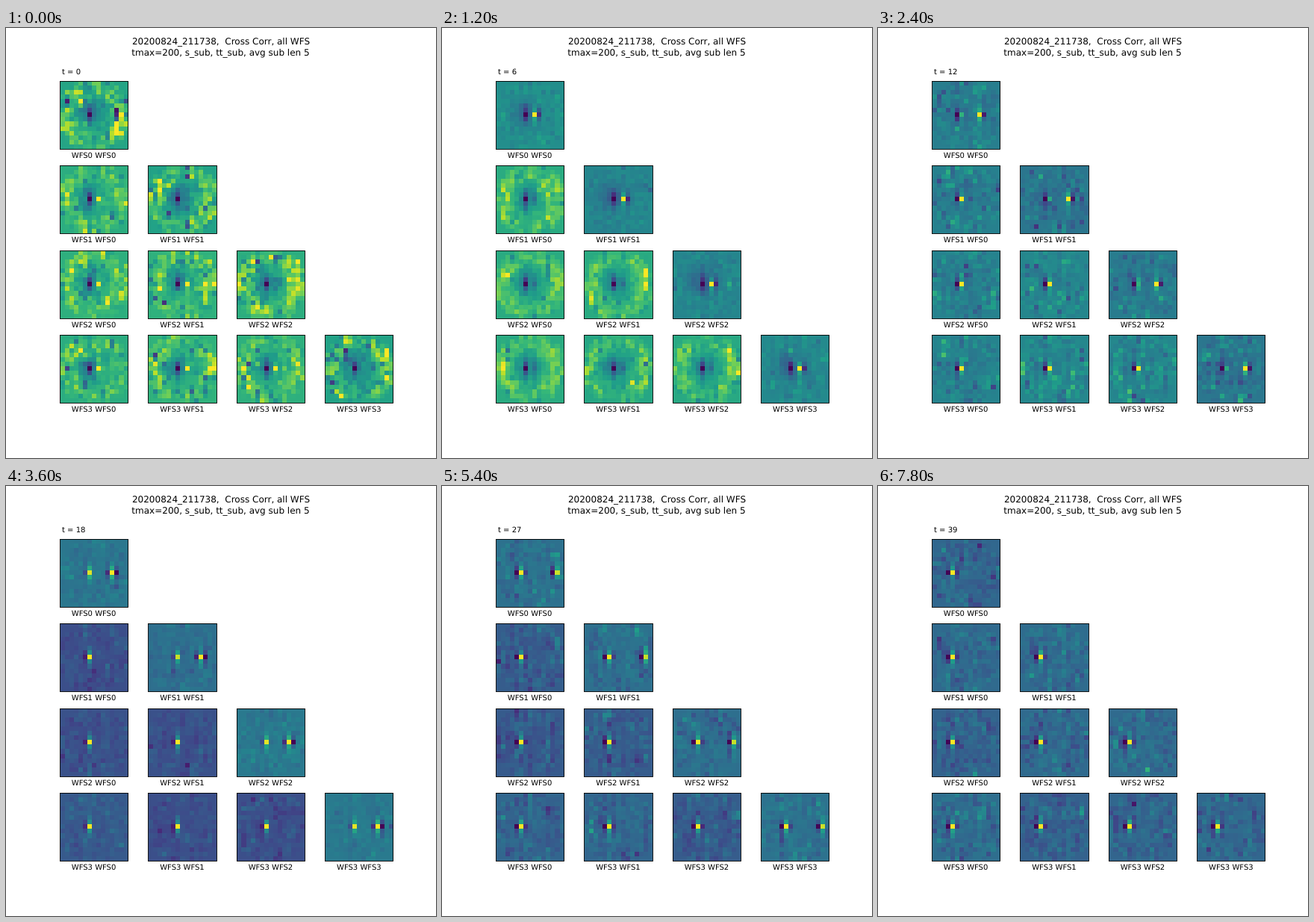
Animation of 576 by 576 pixels, one loop 8 s. Source, as an HTML page:

```html
<!DOCTYPE html>
<html lang="en">
<head>
<meta charset="utf-8">
<title>Cross Corr</title>
<style>
html, body { margin: 0; width: 100%; height: 100%; overflow: hidden; background: #fff; }
svg { display: block; width: 576px; height: 576px; }
text { font: 10px "DejaVu Sans", sans-serif; white-space: pre; text-rendering: geometricPrecision; }
.title { font-size: 12px; }
.mid { text-anchor: middle; }
</style>
</head>
<body>
<svg viewBox="0 0 576 576"></svg>
<script>
const N = 15, MID = 7, SIZE = 91.1, STEP = SIZE / N;
const FRAMES = 40, FRAME_MS = 200;
const svg = document.querySelector('svg');

const VIRIDIS = ['440154', '482878', '3e4989', '31688e', '26828e',
  '1f9e89', '35b779', '6ece58', 'b5de2b', 'fde725']
  .map(h => [0, 2, 4].map(i => parseInt(h.slice(i, i + 2), 16)));

const clamp = v => Math.min(1, Math.max(0, v));
const mix = (a, b, f) => a + (b - a) * f;
const ramp = (t, from, to) => clamp((t - from) / (to - from));
const pulse = (t, at, width) => clamp(1 - Math.abs(t - at) / width);

function color(v) {
  const s = clamp(v) * 9, i = Math.min(8, Math.floor(s));
  return `rgb(${VIRIDIS[i].map((c, j) => Math.round(mix(c, VIRIDIS[i + 1][j], s - i)))})`;
}

// Seeded random number in -1..1.
function hash(...seed) {
  let h = 17;
  for (const s of seed) {
    h = Math.imul(h ^ (s + 11), 2246822519);
    h = Math.imul(h ^ h >>> 15, 3266489917);
    h ^= h >>> 13;
  }
  return (h >>> 0) / 2147483648 - 1;
}

// Drifts in time, runs in vertical streaks and has rare strong outliers.
function noise(p, x, y, t) {
  const k = Math.floor(t / 4);
  const at = i => .7 * hash(p, x, y, i) + .6 * hash(p, x, Math.floor(y / 3), i, 1);
  const n = mix(at(k), at(k + 1), t / 4 - k);
  return n + .8 * n ** 5;
}

// Autocorrelations (diagonal panels) and cross-correlations evolve differently.
const autoLook = t => ({
  level: .34 + .26 * Math.exp(-t / 10) + .13 * pulse(t, 34, 4),
  ring: .2 * (1 - ramp(t, 0, 6)),
  rough: .08 + .03 * ramp(t, 20, 34),
  peak: ramp(t, 8, 26)
});
const crossLook = t => ({
  level: .62 - .36 * ramp(t, 6, 18) + .07 * ramp(t, 18, 30) + .1 * pulse(t, 34, 4),
  ring: .1 + .06 * ramp(t, 0, 6) - .16 * ramp(t, 6, 12),
  rough: .08 + .03 * ramp(t, 20, 34) + .07 * pulse(t, 34, 4),
  peak: ramp(t, 6, 12)
});

function field(p, diagonal, t) {
  const { level, ring, rough, peak } = (diagonal ? autoLook : crossLook)(t);
  const base = level + .03 * hash(p, Math.floor(t / 6));
  const dip = .2 * (1 - ramp(t, 4, 16));
  const cells = [];
  for (let y = 0; y < N; y++) for (let x = 0; x < N; x++) {
    const dx = x - MID, r = Math.hypot(dx, y - MID);
    const inside = ramp(r, 8.6, 7.4), n = noise(p, x, y, t);
    const side = .2 + .8 * Math.abs(dx) / (r || 1);
    const hollow = Math.exp(-((x - 6) ** 2 + (y - 6.5) ** 2) / 7);
    const glow = ring * side * Math.exp(-(((r - 6) / 2) ** 2));
    cells.push(base - dip * hollow + inside * (glow * (1 + n) + rough * (.5 + r / 14) * n));
  }

  // A spot bleeds into the cells above and below.
  const spot = (x, offset) => {
    if (x < 0 || x >= N || !offset) return;
    const d = clamp(base + offset) - base;
    cells[MID * N + x] = base + d;
    for (const [dy, share] of [[1, .32], [2, .12]])
      for (const y of [MID - dy, MID + dy]) cells[y * N + x] += d * share;
  };

  // The slow peak drifts left; its dark edge fades while it lies between two columns.
  const slow = 7 - .072 * t, s = Math.round(slow);
  const edge = Math.max(ramp(slow - s, -.3, 0), 1 - ramp(t, 8, 11));
  spot(s - 1, -mix(.15, 1, edge));
  spot(s, peak);
  spot(s + 1, -.18 * ramp(t, 20, 27));

  if (diagonal) {
    // The fast peak travels right and leaves the panel.
    const f = Math.round(7 + .235 * t), on = ramp(t, 0, 3);
    spot(f - 1, -ramp(t, 15, 26));
    spot(f, on * mix(1, .55, ramp(t, 18, 27)));
    spot(f + 1, -on * mix(.35, .8, ramp(t, 12, 18)) * (1 - ramp(t, 20, 27)));
  } else {
    spot(MID + 1, mix(1, -.25, ramp(t, 0, 5)) * (1 - ramp(t, 6, 11)));
  }
  return cells;
}

function add(tag, attrs, text = '') {
  const el = document.createElementNS('http://www.w3.org/2000/svg', tag);
  for (const k in attrs) el.setAttribute(k, attrs[k]);
  el.textContent = text;
  return svg.appendChild(el);
}

add('text', { x: 288, y: 22, class: 'title mid' }, '20200824_211738,  Cross Corr, all WFS');
add('text', { x: 287.5, y: 37, class: 'title mid' }, 'tmax=200, s_sub, tt_sub, avg sub len 5');
const clock = add('text', { x: 75, y: 62 });

const panels = [];
for (let row = 0; row < 4; row++) for (let col = 0; col <= row; col++) {
  const left = 72 + 118.43 * col, x = Math.round(left), y = Math.round(71 + 113.4 * row);
  const rects = [];
  for (let i = 0; i < N * N; i++) rects.push(add('rect', {
    x: left + .5 + i % N * STEP, y: y - .2 + Math.floor(i / N) * STEP,
    width: STEP, height: STEP, 'shape-rendering': 'crispEdges'
  }));
  add('rect', {
    x: x + .5, y: y + .5, width: Math.round(left + SIZE) - x, height: 91,
    fill: 'none', stroke: '#000', 'stroke-width': .9
  });
  add('text', { x: left + SIZE / 2, y: y + 103, class: 'mid' }, `WFS${row} WFS${col}`);
  panels.push({ rects, diagonal: row === col });
}

const start = performance.now();
let shown = -1;
function draw() {
  const t = Math.floor((performance.now() - start) / FRAME_MS) % FRAMES;
  if (t !== shown) {
    shown = t;
    clock.textContent = `t = ${t}`;
    panels.forEach(({ rects, diagonal }, p) =>
      field(p, diagonal, t).forEach((v, i) => rects[i].setAttribute('fill', color(v))));
  }
  requestAnimationFrame(draw);
}
draw();
</script>
</body>
</html>
```
